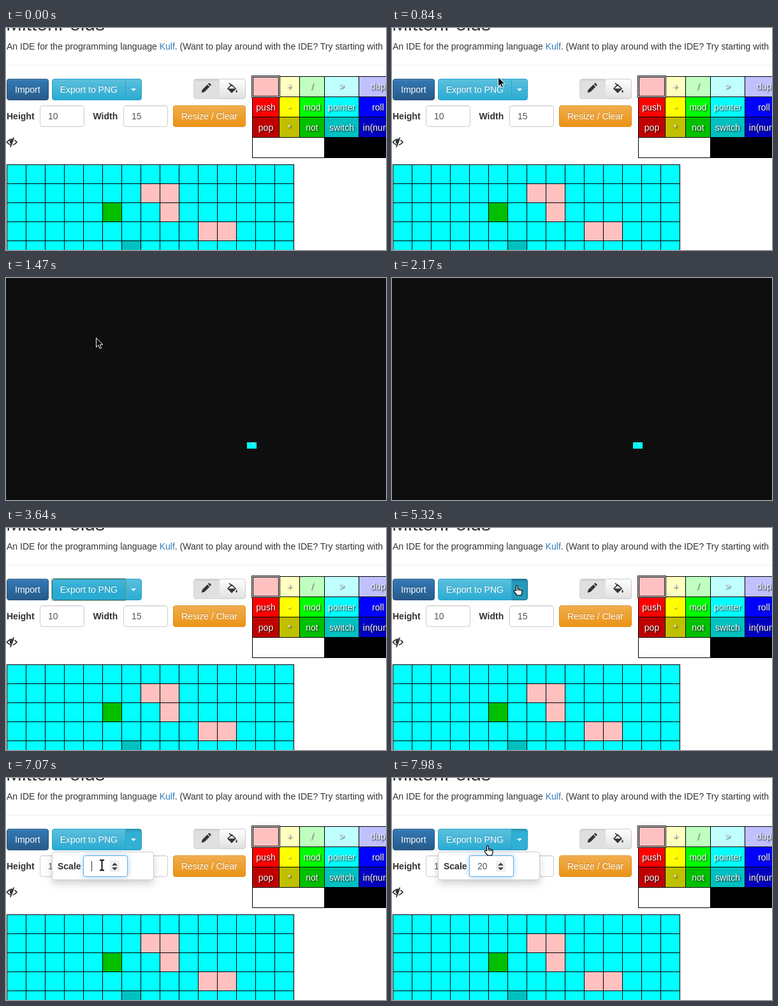
These frames come from a looping animation (596x350 px, 8 s). An HTML page:

```html
<!DOCTYPE html>
<html lang="en">
<head>
<meta charset="utf-8">
<title>Block code editor</title>
<style>
  html, body { margin: 0; width: 100%; height: 100%; overflow: hidden; background: #fff; }
  svg { display: block; font: 14px "Liberation Sans", Arial, sans-serif; fill: #333; }
  .label { font-weight: bold; }
  .value { fill: #555; }
  .btn { fill: #fff; filter: drop-shadow(0 -1px 0 rgba(0,0,0,.2)); }
  .cmd { fill: #fff; text-anchor: middle; filter: drop-shadow(1px 1px 1px #000); }
  .crisp { shape-rendering: crispEdges; }
  .drop { filter: drop-shadow(0 6px 6px rgba(0,0,0,.175)); }
  .glow { filter: drop-shadow(0 0 4px rgba(102,175,233,.6)); }
</style>
</head>
<body>
<svg id="stage" width="596" height="350" viewBox="0 0 596 350"></svg>
<script>
const LOOP = 8000, STEP = 70;
const stage = document.getElementById('stage');
const $ = id => document.getElementById(id);

const rect = (x, y, w, h, fill, more = '') =>
  `<rect x="${x}" y="${y}" width="${w}" height="${h}" fill="${fill}" ${more}/>`;
const text = (x, y, s, cls = '', more = '') =>
  `<text x="${x}" y="${y}" class="${cls}" ${more}>${s}</text>`;
const path = (d, fill, more = '') => `<path d="${d}" fill="${fill}" ${more}/>`;
const grad = (id, stops) => `<linearGradient id="${id}" x2="0" y2="1">` +
  stops.map(([o, c, a = 1]) => `<stop offset="${o}" stop-color="${c}" stop-opacity="${a}"/>`).join('') +
  '</linearGradient>';

const button = (x, y, w, h, fill, border, shine = .15) =>
  rect(x + .5, y + 1.5, w - 1, h - 1, '#000', 'rx="3.5" opacity=".06"') +
  rect(x + .5, y + .5, w - 1, h - 1, fill, `rx="3.5" stroke="${border}"`) +
  path(`M${x + 3} ${y + 1.5}h${w - 6}`, 'none', `stroke="#fff" stroke-opacity="${shine}"`);

const input = (x, id, value) =>
  rect(x + .5, 122.5, 69, 33, '#fff', 'rx="3.5" stroke="#ccc"') +
  path(`M${x + 3} 123.5h64`, 'none', 'stroke="#000" stroke-opacity=".06"') +
  text(x + 13, 144, value, 'value', `id="${id}"`);

const PINK = '#ffc0c0', CYAN = '#00ffff';
const CELLS = [[7, 1, PINK], [8, 1, PINK], [8, 2, PINK], [10, 3, PINK], [11, 3, PINK],
  [5, 2, '#00c000'], [6, 4, '#00c0c0']];

function program(x, y, size) {
  return rect(x, y, 15 * size, 10 * size, CYAN) +
    CELLS.map(([c, r, f]) => rect(x + c * size, y + r * size, size, size, f)).join('');
}

function board() {
  let d = '';
  for (let i = 0; i <= 15; i++) d += `M${1.5 + 30 * i} 215V350`;
  for (let y = 215.5; y < 350; y += 30) d += `M1 ${y}H452`;
  return `<g class="crisp">${program(1, 215, 30)}${path(d, 'none', 'stroke="#000"')}</g>`;
}

function palette() {
  const xs = [386, 428, 460, 499, 553, 613];
  const rows = [
    [['', '+', '/', '&gt;', 'dup'], [PINK, '#ffffc0', '#c0ffc0', '#c0ffff', '#c0c0ff']],
    [['push', '-', 'mod', 'pointer', 'roll'], ['#f00', '#ff0', '#0f0', '#0ff', '#00f']],
    [['pop', '*', 'not', 'switch', 'in(num)'], ['#c00000', '#c0c000', '#00c000', '#00c0c0', '#0000c0']]
  ];
  let cells = '', words = '';
  rows.forEach(([names, fills], r) => names.forEach((name, c) => {
    const x = xs[c], w = xs[c + 1] - x, y = 76 + 32 * r;
    cells += rect(x + .5, y + .5, w, 32, fills[c], 'stroke="#000"');
    words += text(x + w / 2 + .5, y + 21 + (r > 0), name, 'cmd');
  }));
  cells += rect(386.5, 172.5, 113, 32, '#fff', 'stroke="#000"') + rect(499, 172, 114, 33, '#000');
  cells += rect(386.5, 76.5, 42, 32, 'none', 'stroke="#fff"') +
    rect(385.5, 75.5, 44, 34, 'none', 'stroke="#000"') +
    rect(387.5, 77.5, 40, 30, 'none', 'stroke="#000"');
  return `<g class="crisp">${cells}</g>${words}`;
}

function icons() {
  return button(334, 80, 42, 32, 'url(#plain)', '#ccc', .5) +
    path('M335 80.5H298a3.5 3.5 0 0 0-3.5 3.5v24a3.5 3.5 0 0 0 3.5 3.5H335', '#e0e0e0', 'stroke="#d4d4d4"') +
    path('M296 82h38', 'none', 'stroke="#000" stroke-width="3" stroke-opacity=".06"') +
    path('M306.500 102l1.300-4.800 8-8 3.500 3.500-8 8ZM316.800 88.200l1.200-1.100q.8-.6 1.500 0l1.900 1.900q.7.8 0 1.500l-1.200 1.200Z', '#333') +
    path('M354 89.500l6 6-6 6-6-6ZM350 87l4.500 4.500', 'none', 'stroke="#333" stroke-width="1.6"') +
    path('M348 95.500h12l-6 6ZM361.500 97q2.500 4 0 5-2.500-1 0-5Z', '#333') +
    path('M1.500 180Q9 171 17 180Q9 189 1.500 180Z', 'none', 'stroke="#333" stroke-width="1.800"') +
    '<circle cx="9" cy="179.500" r="3.200"/>' +
    path('M14 173L8.500 188', 'none', 'stroke="#fff" stroke-width="1.500"') +
    path('M12.300 172.500L6.800 188', 'none', 'stroke="#333" stroke-width="1.700"');
}

const exportShape = 'M187.5 80.5H76a3.5 3.5 0 0 0-3.5 3.5v26a3.5 3.500 0 0 0 3.5 3.5H187.5Z';
const toggleShape = 'M187.5 80.5H209a3.5 3.5 0 0 1 3.5 3.5v26a3.5 3.500 0 0 1-3.5 3.5H187.5Z';

function toolbar() {
  return button(1, 80, 66, 34, 'url(#blue)', '#245580') + text(14, 102, 'Import', 'btn') +
    path(toggleShape, '', 'id="toggle"') +
    path(exportShape, '', 'id="export"') +
    path('M187.500 81V113', 'none', 'stroke="#28a4c9"') +
    rect(188, 81, 24, 5, 'url(#inset)', 'id="toggleInset"') +
    rect(73, 81, 114, 5, 'url(#inset)', 'id="exportInset"') +
    rect(71.5, 79.5, 117, 35, 'none', 'id="ring" rx="2" stroke="#8f9a5c" stroke-opacity=".75"') +
    text(84.7, 102, 'Export to PNG', 'btn') +
    path('M196 95.500h8l-4 4Z', '#fff') +
    text(1, 144, 'Height', 'label') + input(53, 'height', '10') +
    text(136.5, 144, 'Width', 'label') + input(184, 'width', '15') +
    button(262, 122, 114, 34, 'url(#orange)', '#e38d13') + text(275, 144, 'Resize / Clear', 'btn');
}

function menu() {
  return '<g id="menu">' +
    rect(72.5, 116.5, 159, 44, '#fff', 'rx="4" class="drop" stroke="#ccc"') +
    text(81, 144, 'Scale', 'label') + input(121, 'scale', '1') +
    '<g id="focus">' + rect(121.5, 122.5, 69, 33, '#fff', 'rx="3.5" class="glow" stroke="#66afe9"') + '</g>' +
    text(134, 144, '', 'value', 'id="typed"') +
    rect(163, 130, 15, 18, '#f0f0f0') +
    path('M166 138l4.500-4.500 4.500 4.500ZM166 141h9l-4.500 4.500Z', '#444') +
    rect(0, 131, 1, 16, '#333', 'id="caret"') + '</g>';
}

function cursors() {
  const edge = 'stroke-linejoin="round" stroke=';
  return '<g id="arrow">' +
    path('M.5.500V15l3.400-3.200 2.300 5.400 2.400-1-2.300-5.200H11Z', '#000', edge + '"#fff"') + '</g><g id="hand">' +
    path('M-1.500 9V1.800q0-1.300 1.300-1.300t1.300 1.300V6q2-.8 2.400.6 2-.6 2.400.8 2.100-.5 2.100 1.400v3.400L6.500 16H0L-4.700 10.200Q-5 8.300-3.300 8.500Z', '#fff', edge + '"#000" stroke-width="1.200"') +
    path('M1.100 6v3M3.500 6.600v2.800M5.900 7.400v2.200', 'none', 'stroke="#000"') + '</g><g id="beam">' +
    ['#fff" stroke-width="3.600', '#000" stroke-width="1.800'].map(s =>
      path('M-3-7.500H-1Q.5-7.500.5-6V7Q.5 8.500-1 8.500H-3M4-7.500H2Q.5-7.500.5-6M4 8.500H2Q.5 8.500.5 7', 'none', `stroke="${s}"`)).join('') + '</g>';
}

stage.innerHTML = '<defs>' +
  grad('blue', [[0, '#337ab7'], [1, '#265a88']]) +
  grad('info', [[0, '#5bc0de'], [1, '#2aabd2']]) +
  grad('hover', [[0, '#45b7d9'], [.56, '#2aabd2']]) +
  grad('orange', [[0, '#f0ad4e'], [1, '#eb9316']]) +
  grad('plain', [[0, '#fff'], [1, '#e0e0e0']]) +
  grad('inset', [[0, '#000', .16], [1, '#000', 0]]) + '</defs>' +
  rect(0, 0, 596, 350, '#fff') +
  text(0, 4, 'MittenFolds', '', 'font-size="30"') +
  text(1, 34, 'An IDE for the programming language <tspan fill="#337ab7">Kulf</tspan>. (Want to play around with the IDE? Try starting with') +
  rect(0, 58, 596, 1, '#eee') +
  toolbar() + icons() + palette() + board() + menu() +
  `<g id="viewer" class="crisp">${rect(0, 0, 596, 350, '#0e0e0e')}${program(378, 259, 1)}</g>` + cursors();

// Pointer moves: start, steps, from x, y, to x, y
const MOVES = [
  [350, 11, 276, 0, 141, 94],
  [2100, 1, 141, 94, 189, 15],
  [4270, 3, 203, 14, 226, 52],
  [4690, 5, 226, 52, 196, 90],
  [5600, 7, 196, 90, 150, 137],
  [7840, 3, 150, 137, 150, 106]
];
const smooth = k => k * k * (3 - 2 * k);
const show = (id, on) => $(id).style.display = on ? '' : 'none';
const within = (t, a, b) => t >= a && t < b;

function pointer(t) {
  if (t < 350 || within(t, 2170, 4270)) return null;
  const [start, steps, x0, y0, x1, y1] = MOVES.filter(m => m[0] <= t).pop();
  const k = smooth(Math.min(1, (Math.floor((t - start) / STEP) + 1) / steps));
  return { x: Math.round(x0 + (x1 - x0) * k), y: Math.round(y0 + (y1 - y0) * k) };
}

function paint(id, look) {
  const [fill, border] = {
    normal: ['url(#info)', '#28a4c9'],
    hover: ['url(#hover)', '#28a4c9'],
    focus: ['url(#hover)', '#1b6d85'],
    open: ['#31b0d5', '#269abc'],
    press: ['#269abc', '#1b6d85']
  }[look];
  $(id).setAttribute('fill', fill);
  $(id).setAttribute('stroke', border);
  show(id + 'Inset', look === 'press' || look === 'open');
}

function draw(t) {
  const p = pointer(t), opened = t >= 5390;
  const onBar = p && p.y >= 80 && p.y < 114 && p.x >= 72 && p.x < 213;
  const onExport = onBar && p.x < 187 && t < 7000;
  const onInput = p && opened && p.x > 121 && p.x < 191 && p.y > 122;
  const kind = !p ? '' : within(t, 1400, 2170) ? 'arrow' : onBar ? 'hand' : onInput ? 'beam' : 'arrow';
  for (const id of ['arrow', 'hand', 'beam']) {
    show(id, id === kind);
    if (id === kind) $(id).setAttribute('transform', `translate(${p.x} ${p.y})`);
  }

  const focused = within(t, 1400, 5320);
  paint('export', within(t, 1330, 1400) ? 'press' : focused ? 'focus' : onExport ? 'hover' : 'normal');
  paint('toggle', t >= 6160 ? 'open' : t >= 5320 ? 'press' : onBar && p.x >= 187 ? 'hover' : 'normal');
  show('ring', focused);
  show('viewer', within(t, 1470, 3640));

  show('menu', opened);
  $('focus').style.opacity = Math.max(0, Math.min(1, (Math.floor((t - 6160) / STEP) + 1) / 3));
  const typed = t < 7070 ? '1' : t < 7210 ? '' : t < 7350 ? '2' : '20';
  $('typed').textContent = typed;
  $('scale').textContent = '';
  $('caret').setAttribute('x', 134 + 8 * typed.length);
  show('caret', within(t, 6160, 6790) || within(t, 7070, 7840));
}

const begin = performance.now();
function tick() {
  draw((performance.now() - begin) % LOOP);
  requestAnimationFrame(tick);
}
tick();
</script>
</body>
</html>
```
